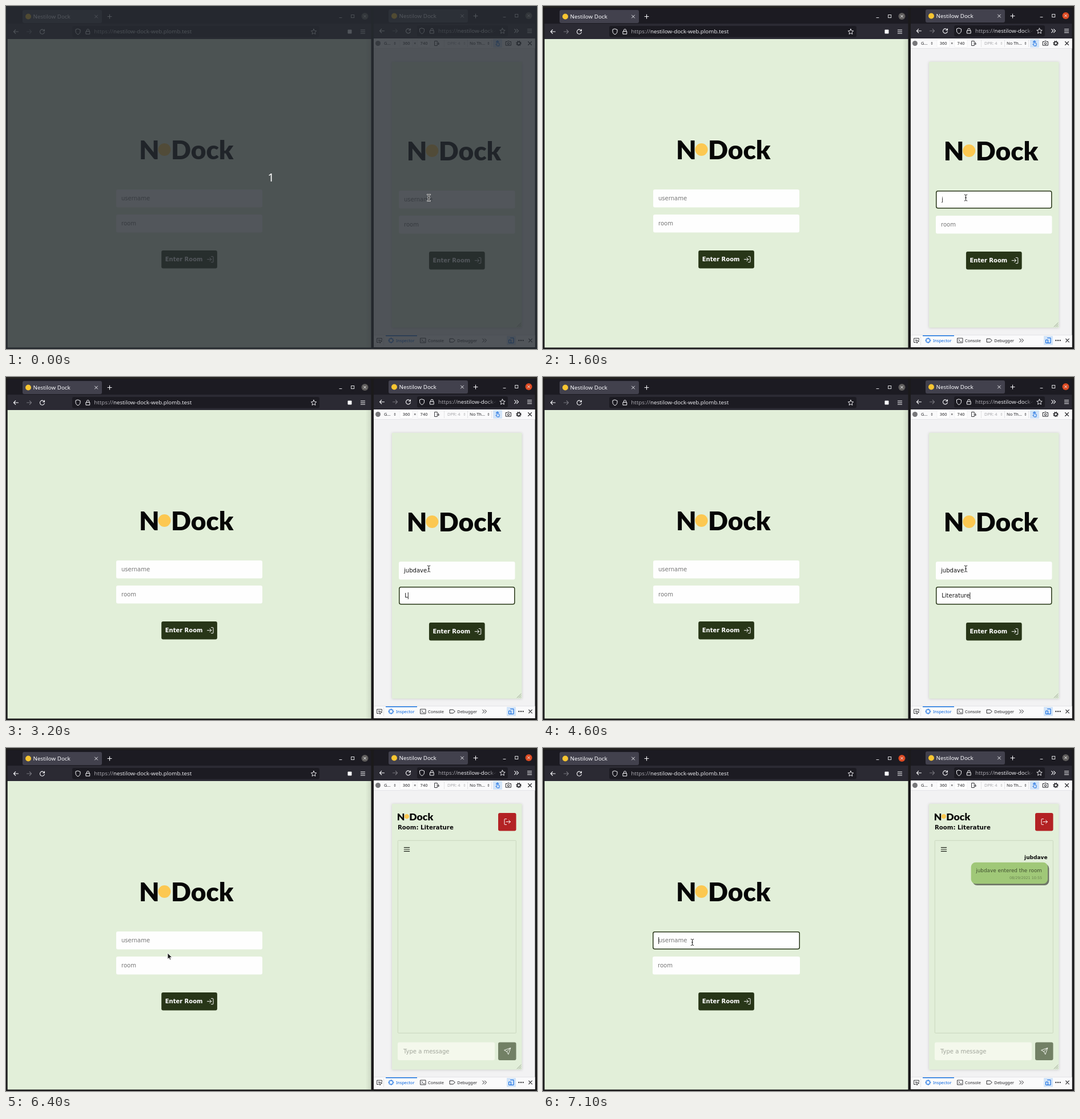
These frames come from a looping animation (930x602 px, 8 s). An HTML page:

```html
<!DOCTYPE html>
<html lang="en">
<head>
<meta charset="utf-8">
<title>Chat room demo</title>
<style>
html, body { margin: 0; width: 100%; height: 100%; overflow: hidden; background: #1b1a1b; }
svg { display: block; }
text { white-space: pre; }
.ui { font-family: "Noto Sans", "Open Sans", sans-serif; }
.page { font-family: "DejaVu Sans", sans-serif; }
.logo { font-family: Lato, sans-serif; font-weight: 900; }
</style>
</head>
<body>
<svg id="stage" width="930" height="602" viewBox="0 0 930 602"></svg>
<script>
const LOOP = 8000;
const GREEN = '#e2efd9', DARK = '#283618', BAR = '#1c1b22', TOOL = '#2b2a33', INK = '#fbfbfe', CHECKED = '#d2e4f8';
const APP = 'Nestilow Dock', HOST = 'nestilow-dock-web.plomb.test';
const USER = 'jubdave', ROOM = 'Literature';

const rect = (x, y, w, h, fill, r = 0, more = '') =>
  `<rect x="${x}" y="${y}" width="${w}" height="${h}" fill="${fill}" rx="${r}" ${more}/>`;
const text = (x, y, s, size, fill, cls = 'ui', more = '') =>
  `<text x="${x}" y="${y}" font-size="${size}" fill="${fill}" class="${cls}" ${more}>${s}</text>`;
const dot = (x, y, r, fill, more = '') => `<circle cx="${x}" cy="${y}" r="${r}" fill="${fill}" ${more}/>`;
const icon = (x, y, d, color = INK, w = 1.1, more = '') =>
  `<path transform="translate(${x} ${y})" d="${d}" fill="none" stroke="${color}" stroke-width="${w}" stroke-linecap="round" stroke-linejoin="round" ${more}/>`;
const group = (id, body, more = '') => `<g id="${id}" ${more}>${body}</g>`;

const P = {
  cross: 'M-2.5-2.5L2.5 2.5M2.5-2.5L-2.5 2.5',
  plus: 'M-3.5 0H3.5M0-3.5V3.5',
  back: 'M4 0H-4M-.8-3.3L-4 0L-.8 3.3',
  next: 'M-4 0H4M.8-3.3L4 0L.8 3.3',
  reload: 'M3.7-1.3A4 4 0 1 0 3.9 1M3.9-4V-1.2H1.1',
  shield: 'M0-4.8L4-3.4V-.5C4 2 2.5 4 0 4.9C-2.5 4-4 2-4-.5V-3.4Z',
  lock: 'M-3.2-.6H3.2V4.2H-3.2ZM-2-.6V-2.4A2 2 0 0 1 2-2.4V-.6',
  star: 'M0-4.7L1.4-1.6L4.7-1.2L2.2 1L2.9 4.4L0 2.7L-2.9 4.4L-2.2 1L-4.7-1.2L-1.4-1.6Z',
  menu: 'M-3.6-3H3.6M-3.6 0H3.6M-3.6 3H3.6',
  more: 'M-3.3-3L-.3 0L-3.3 3M.5-3L3.5 0L.5 3',
  enter: 'M-5.5 0H1.7M-1.2-3L1.8 0L-1.2 3M1.5-5H4.2Q5 -5 5-4.2V4.2Q5 5 4.2 5H1.5',
  leave: 'M-1.5-5H-4.2Q-5-5-5-4.2V4.2Q-5 5-4.2 5H-1.5M-1.7 0H5.3M2.6-2.8L5.4 0L2.6 2.8',
  plane: 'M5.5-5.5L-5.5-1.6L-.8.8L1.6 5.5ZM5.5-5.5L-.8.8',
  spin: 'M-1.2-.9L0-2.3L1.2-.9ZM-1.2.9L0 2.3L1.2.9Z',
  arrow: 'M0 0V10.6L2.5 8.4L4.1 12L6 11.2L4.4 7.7H7.8Z',
  beam: 'M-2.3-5.5Q0-5.5 0-4.3V4.3Q0 5.5-2.3 5.5M2.3-5.5Q0-5.5 0-4.3M0 4.3Q0 5.5 2.3 5.5M-1 0H1'
};

// Browser title bar; (x, y) is the left end of the tab
function titleBar(id, x, y, min) {
  return rect(x, y, 139, 23, '#42414d', 3) + dot(x + 10, y + 11.5, 5, '#f7c531') +
    text(x + 18.5, y + 15, APP, 9.8, INK) + icon(x + 129, y + 11.5, P.cross, INK, .9) +
    icon(x + 152.5, y + 11.5, P.plus, INK) + icon(min, y + 12.5, 'M-2 1H2', '#dedee2') +
    rect(min + 18.7, y + 8.5, 5, 5, 'none', 0, 'stroke="#dedee2"') +
    dot(min + 42.5, y + 11, 6, '#5f5d5c', `id="${id}"`) +
    icon(min + 42.5, y + 11, 'M-2-2L2 2M2-2L-2 2', '#f0f0f0', 1);
}
const navIcons = (x, y) => icon(x, y, P.back) + icon(x + 23, y, P.next, '#77767e') + icon(x + 46, y, P.reload);
const address = (x, y) => text(x, y, `<tspan fill="#a5a4ab">https://</tspan>${HOST}`, 9.75, '#e6e6ea');

const logo = (x, y, k = 1) => `<g transform="translate(${x} ${y}) scale(${k})">` +
  text(-3, 32.7, 'N', 46, '#060606', 'logo') + dot(41.5, 16, 11, '#fcc851') +
  text(53, 32.7, 'Dock', 46, '#060606', 'logo') + '</g>';

function field(id, x, y, w, hint) {
  return rect(x, y, w, 31.5, '#fefefe', 3, `id="${id}Box"`) +
    text(x + 9, y + 19.3, hint, 10.05, '#767676', 'page', `id="${id}Text"`) +
    rect(x + 10, y + 10, .9, 12, '#111', 0, `id="${id}Caret" visibility="hidden"`);
}
function login(id, x, y, w) {
  const mid = x + w / 2;
  return logo(mid - 85, y - 86) + field(id + 'User', x, y, w, 'username') +
    field(id + 'Room', x, y + 44, w, 'room') + rect(mid - 48.8, y + 107, 97.7, 31.5, DARK, 3) +
    text(mid - 42.3, y + 126.2, 'Enter Room', 10, '#fff', 'page', 'font-weight="bold"') +
    icon(mid + 37, y + 122.7, P.enter, '#fff', 1);
}

function devTools() {
  const k = '#222226', line = '#d8d8dc';
  let s = rect(644, 57, 282.5, 542, '#f2f2f3') + rect(644, 57, 282.5, 17, '#fafafb') + rect(644, 74, 282.5, .8, '#e2e2e5');
  s += dot(651.5, 65.5, 4.5, '#77777a') + text(662, 68.3, 'G…', 7.6, k);
  for (const x of [681, 845]) s += icon(x, 65.5, P.spin, k, .2, `style="fill:${k}"`);
  s += icon(803, 65.5, P.spin, '#aaa', .2, 'style="fill:#aaa"');
  for (const x of [690, 721]) s += rect(x, 58.5, 22, 14, '#fff', 1, 'stroke="#ededf0" stroke-width=".7"');
  s += text(694.7, 68.3, '360', 7.5, k) + text(714.2, 68.2, '×', 7, k) + text(725.6, 68.3, '740', 7.5, k);
  s += icon(754, 65.5, 'M-3-4H1.3V4H-3ZM3.5-1.8V2M2.1.7L3.5 2.1L4.9.7', k, .9);
  s += text(773, 68.2, 'DPR: 4', 7.4, '#a4a4a8') + text(812, 68.3, 'No Th…', 7.5, k);
  for (const x of [767, 808, 850]) s += rect(x, 59, .7, 13, line);
  s += rect(853, 58, 16, 15, CHECKED, 1) +
    icon(861, 65.5, 'M-1.2 0V-3.2A.9.9 0 0 1 .6-3.2V-.6L2.7-.2Q3.5 0 3.3.9L2.6 4.5H-.8L-3.2 1.6L-2.5 1L-1.2 2M-2.7-2.2A2.7 2.7 0 0 1 2.2-2.8', '#0060df', .9);
  s += icon(880, 65.5, 'M-4.4-3H-2L-1.2-4H1.2L2-3H4.4V3.6H-4.4Z', k, 1) + dot(880, 65.8, 1.7, 'none', `stroke="${k}"`);
  s += dot(898, 65.5, 2.7, 'none', `stroke="${k}" stroke-width="1.6"`) +
    dot(898, 65.5, 4, 'none', `stroke="${k}" stroke-width="1.5" stroke-dasharray="1.5 1.64"`);
  s += icon(917.5, 65.5, 'M-3-3L3 3M3-3L-3 3', k);
  s += rect(644, 578, 282.5, 21, '#fafafb') + rect(644, 577.3, 282.5, .8, '#e0e0e3');
  s += icon(654, 587, 'M-1.5 3.5H-4.3V-3.8H4.3V-1M-1-1L4.7 1.2L2.2 2.2L1.2 4.6Z', k, .9);
  s += rect(661, 580, .7, 15, line) + rect(665, 578, 55, 1.4, '#0a6de0') +
    icon(674.5, 587, 'M-3-3H3V3H-3ZM0-4.7V-3M0 3V4.7M-4.7 0H-3M3 0H4.7', '#0060df', 1);
  s += text(683, 589.8, 'Inspector', 7.25, '#0060df') + text(739, 589.8, 'Console', 7.45, k) + text(790.3, 589.8, 'Debugger', 7.35, k);
  s += icon(730.5, 587, 'M-4.5-4H4.5V4H-4.5ZM-2.5-1.8L-.7 0L-2.5 1.8M.3 2H2.4', k, .9);
  s += icon(782, 587, 'M-4.5-3H1.3L4.3 0L1.3 3H-4.5Z', k, 1) + icon(838, 587, P.more, k, 1);
  s += rect(877, 579, 16, 16, CHECKED, 1) + icon(885, 587, 'M-1.5-4.4H4V4.4H-1M-4-1H-.6V4.4H-4Z', '#0060df', 1);
  for (const x of [-3.6, 0, 3.6]) s += dot(902 + x, 587, 1.15, k);
  return s + icon(918.5, 587, 'M-2.8-2.8L2.8 2.8M2.8-2.8L-2.8 2.8', k);
}

function chat() {
  return logo(686, 114, .383) +
    text(686, 143.3, 'Room: ' + ROOM, 10.2, '#0b0b0b', 'page', 'font-weight="bold"') +
    rect(862, 114, 31.5, 31.5, '#b32224', 3) + icon(878, 129.5, P.leave, '#fff', 1) +
    rect(686.3, 162.3, 207, 338, 'none', 1, 'stroke="#c7d5bb" stroke-width=".9"') +
    icon(702, 178, 'M-4.7-3.4H4.7M-4.7 0H4.7M-4.7 3.4H4.7', '#20241c', 1.1) +
    rect(686, 516.5, 170, 31.5, '#f4f8ec', 3) + text(696, 536, 'Type a message', 10, '#a2a69c', 'page') +
    rect(862, 516.5, 31.5, 31.5, '#728065', 3) + icon(878, 532, P.plane, '#f2f5ee', 1) +
    group('message',
      text(883.5, 195, USER, 9, '#0b0b0b', 'page', 'font-weight="bold" text-anchor="end"') +
      rect(752.3, 203.5, 134, 37.5, '#6f7668', 8, 'filter="url(#soft)"') +
      rect(749.7, 200.8, 134.3, 37.5, '#a0c878', 8) +
      text(758.3, 218, USER + ' entered the room', 8.85, '#40502f', 'page') +
      text(874, 230.2, '08/29/2021 10:55', 6.36, '#6b8551', 'page', 'text-anchor="end"'));
}

const stage = document.getElementById('stage');
stage.innerHTML = `<defs>
  <linearGradient id="shade"><stop offset="0" stop-opacity="0"/><stop offset="1" stop-opacity=".09"/></linearGradient>
  <linearGradient id="fade"><stop offset="0" stop-color="${BAR}" stop-opacity="0"/><stop offset="1" stop-color="${BAR}"/></linearGradient>
  <filter id="soft" x="-10%" y="-20%" width="120%" height="140%"><feGaussianBlur stdDeviation=".7"/></filter>
  <filter id="glow" x="-5%" y="-5%" width="110%" height="110%"><feGaussianBlur stdDeviation="2"/></filter>
  <clipPath id="short"><rect x="757" y="34" width="101" height="20"/></clipPath></defs>` +
  rect(0, 0, 930, 602, '#1b1a1b') + rect(0, 0, 930, 3, '#242321') +
  rect(2.5, 4, 637, 28, BAR, 3) + rect(2.5, 31, 637, 27, TOOL) + titleBar('leftClose', 29, 7, 586) +
  navIcons(17.5, 45) + rect(116, 35, 433, 19.5, BAR, 3) + icon(126, 45, P.shield, INK, 1) +
  icon(143.5, 45, P.lock, INK, 1) + address(154.3, 48.4) + icon(539, 45, P.star, INK, .9) +
  rect(598.5, 41.5, 7, 7, INK, 1) + icon(625, 45, P.menu) +
  rect(2.7, 58, 636.8, 541.5, GREEN) + group('leftPage', login('l', 193, 322, 256)) +
  rect(629.5, 58, 10, 541.5, 'url(#shade)', 0, 'id="edge"') +
  rect(644, 3, 282.5, 29, BAR, 3) + rect(644, 31, 282.5, 26, TOOL) + titleBar('rightClose', 670, 6, 873) +
  navIcons(658.5, 43.7) + rect(720, 34, 159, 19.5, BAR, 3) + icon(728.5, 43.7, P.shield, INK, 1) +
  icon(746, 43.7, P.lock, INK, 1) + `<g clip-path="url(#short)">${address(757, 47)}</g>` +
  rect(842, 35, 17, 17, 'url(#fade)') + icon(869.5, 43.7, P.star, INK, .9) +
  icon(894, 43.7, P.more) + icon(917, 43.7, P.menu) + devTools() +
  rect(676, 98.5, 227.5, 466.5, '#0000002c', 0, 'filter="url(#glow)"') + rect(676, 98, 227.5, 466.5, GREEN) +
  group('rightLogin', login('r', 688, 324, 203.5)) + group('chat', chat()) +
  icon(903, 564, 'M-8-1L-1-8M-5-1L-1-5M-2-1L-1-2', '#8d9687', .8) +
  group('intro', rect(0, 0, 930, 602, '#272c33', 0, 'fill-opacity=".8"') +
    text(464, 307.5, '1', 19.5, '#fff', 'ui', 'text-anchor="middle"')) +
  group('pointer', icon(0, 0, P.arrow, '#fff', .9, 'style="fill:#1c1c1c"')) +
  group('beam', icon(0, 0, P.beam, '#ffffffd0', 2.6) + icon(0, 0, P.beam, '#222', 1));

const el = id => document.getElementById(id);
const show = (id, on) => el(id).setAttribute('visibility', on ? 'inherit' : 'hidden');

// time, letters of name, letters of room, focused field, caret
const TYPING = [
  [0, 0, 0, '', 0], [400, 0, 0, 'User', 1], [1600, 1, 0, 'User', 0], [1800, 2, 0, 'User', 1],
  [1900, 4, 0, 'User', 1], [2200, 6, 0, 'User', 1], [2400, 7, 0, 'User', 1], [2700, 7, 0, 'Room', 1],
  [3200, 7, 1, 'Room', 1], [3400, 7, 2, 'Room', 1], [3700, 7, 4, 'Room', 1], [3800, 7, 6, 'Room', 1],
  [4000, 7, 7, 'Room', 1], [4300, 7, 8, 'Room', 1], [4500, 7, 9, 'Room', 1], [4600, 7, 10, 'Room', 1]
];
// time, x, y, shape
const MOVES = [
  [0, 740.5, 336.5, 'beam'], [5400, 740.5, 336, 'pointer'], [5700, 745, 351, 'pointer'],
  [5900, 466, 400, 'pointer'], [6100, 392, 380, 'beam'], [6200, 334, 360, 'pointer'],
  [6400, 283, 360, 'pointer'], [6700, 266, 347, 'beam'], [6800, 261.5, 341, 'beam']
];
const at = (table, t) => table.filter(row => row[0] <= t).pop();

function paint(id, x, y, w, value, hint, focus, caret) {
  const label = el(id + 'Text'), inset = focus ? .75 : 0, left = x + 9 + (focus ? 1.2 : 0);
  const box = {
    x: x + inset, y: y + inset, width: w - 2 * inset, height: 31.5 - 2 * inset,
    stroke: focus ? DARK : 'none', 'stroke-width': 1.5
  };
  for (const name in box) el(id + 'Box').setAttribute(name, box[name]);
  label.textContent = value || hint;
  label.setAttribute('fill', value ? '#151515' : '#767676');
  label.setAttribute('x', left);
  el(id + 'Caret').setAttribute('x', left + (value ? label.getComputedTextLength() : 0));
  show(id + 'Caret', focus && caret);
}

let last = '';
function draw(t) {
  const key = at(TYPING, t), move = at(MOVES, t);
  const inRoom = t >= 5400, greeted = t >= 6500, switched = t >= 6900, intro = t < 400;
  const state = [key[0], move[0], inRoom, greeted, switched].join();
  if (state === last) return;
  last = state;
  show('intro', intro);
  show('rightLogin', !inRoom);
  show('chat', inRoom);
  show('message', inRoom && greeted);
  show('edge', !switched);
  el('leftClose').setAttribute('fill', switched ? '#dc4a22' : '#5f5d5c');
  el('rightClose').setAttribute('fill', intro || switched ? '#5f5d5c' : '#dc4a22');
  paint('rUser', 688, 324, 203.5, USER.slice(0, key[1]), 'username', key[3] === 'User', key[4]);
  paint('rRoom', 688, 368, 203.5, ROOM.slice(0, key[2]), 'room', key[3] === 'Room', key[4]);
  const grow = switched ? 1 : 0;
  paint('lUser', 193 - grow, 322, 256 + 2 * grow, '', 'username', switched, 1);
  paint('lRoom', 193 - grow, 366, 256 + 2 * grow, '', 'room', false, 0);
  for (const id of ['pointer', 'beam']) {
    show(id, id === move[3]);
    el(id).setAttribute('transform', `translate(${move[1]} ${move[2]})`);
  }
}

const start = performance.now();
function tick(now) {
  draw(Math.max(0, now - start) % LOOP);
  requestAnimationFrame(tick);
}
draw(0);
requestAnimationFrame(tick);
</script>
</body>
</html>
```
